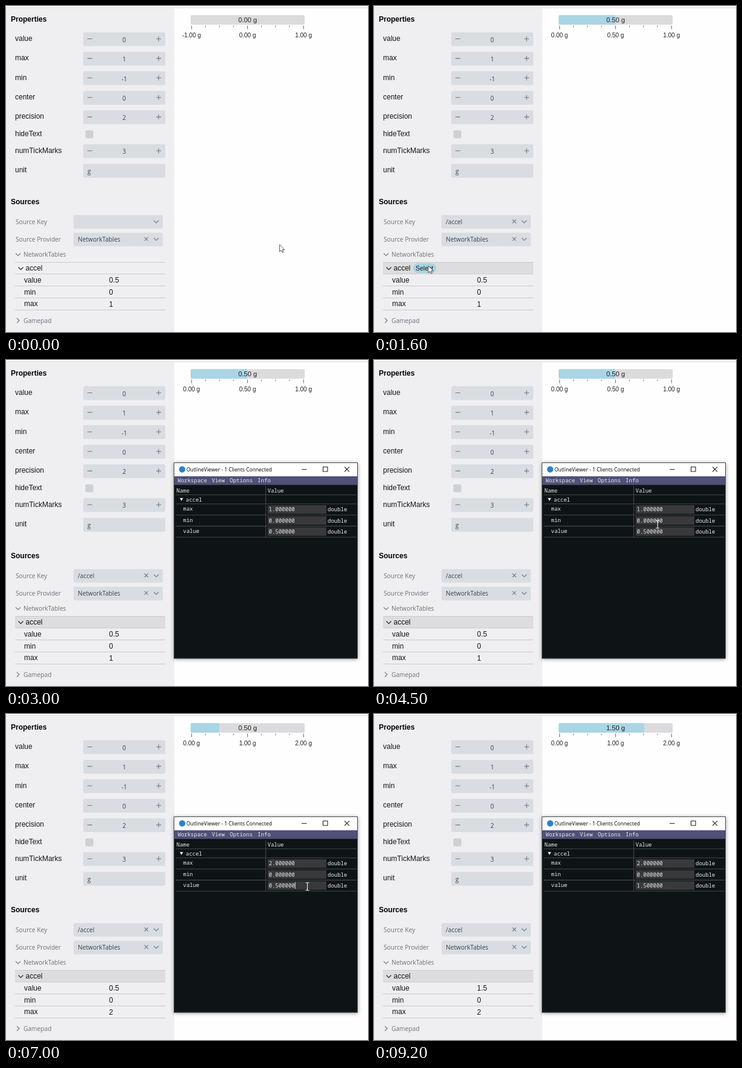
An HTML page that plays this animation: 600x541 px, repeating every 9900 ms.

```html
<!DOCTYPE html>
<html lang="en">
<head>
<meta charset="utf-8">
<title>Accelerometer properties</title>
<style>
  html, body { margin: 0; width: 100%; height: 100%; overflow: hidden; background: #fff; }
  svg { display: block; width: 600px; height: 541px; }
  text { white-space: pre; font: 12px "Liberation Sans", Arial, sans-serif; fill: #161616; }
  .head { font-weight: bold; fill: #000; }
  .ui { font: 10.2px "Open Sans", "Noto Sans", sans-serif; fill: #3b4150; }
  .dim { fill: #6d717b; }
  .mid { text-anchor: middle; }
  .tick { font-size: 10px; fill: #222; }
  .gauge { font-size: 11.2px; fill: #222; }
  .pill { font-size: 10.5px; }
  .title { font: 8.5px "Open Sans", "Noto Sans", sans-serif; fill: #000; }
  .mono { font: 9px "Noto Sans Mono", "DejaVu Sans Mono", monospace; fill: #e6e8e9; }
  .icon { fill: none; stroke: #747a84; stroke-width: 1.1; }
  .dark { stroke: #222; }
  .rule { stroke: #cac9cc; }
  .grid { stroke: #43474b; }
  .box { fill: #d9dde1; }
  .field { fill: #39393b; }
</style>
</head>
<body>
<svg id="stage" viewBox="0 0 600 541" xmlns="http://www.w3.org/2000/svg"></svg>
<script>
const LOOP = 9900, STEP = 100;
const stage = document.getElementById('stage');

const text = (x, y, s, cls = '', id = '') => `<text x="${x}" y="${y}" class="${cls}" id="${id}">${s}</text>`;
const rect = (x, y, w, h, attrs = '') => `<rect x="${x}" y="${y}" width="${w}" height="${h}" ${attrs}/>`;
const path = (d, cls = 'icon') => `<path d="${d}" class="${cls}"/>`;
const group = (id, body) => `<g id="${id}">${body}</g>`;
const box = (x, y, w, h) => rect(x, y, w, h, 'rx="2.5" class="box"');
const down = (x, y, cls) => path(`M${x - 4} ${y - 2}l4 4l4 -4`, cls);
const cross = (x, y, r, cls) => path(`M${x - r} ${y - r}l${2 * r} ${2 * r}m0 ${-2 * r}l${-2 * r} ${2 * r}`, cls);

function spinner(label, value, y) {
  return text(15, y + 2.8, label) + box(128, y - 11.5, 136, 23) +
    path(`M135 ${y - .5}h8M249 ${y - .5}h8m-4 -4v8`) + text(196, y + 4.7, value, 'ui mid');
}

function properties() {
  const rows = [['value', 0], ['max', 1], ['min', -1], ['center', 0], ['precision', 2]];
  return text(8, 26, 'Properties', 'head') +
    rows.map(([name, v], i) => spinner(name, v, 55 + i * 32.4)).join('') +
    text(15, 215.5, 'hideText') + rect(131.5, 206.3, 13.3, 13.3, 'rx="3" fill="#cdd1d5"') +
    spinner('numTickMarks', 3, 240.7) +
    text(15, 275.8, 'unit') + box(128, 262, 136, 23) + text(135, 277.5, 'g', 'ui');
}

function sources() {
  const rows = [['value', '0.5'], ['min', '0'], ['max', '1']];
  return text(8, 329.3, 'Sources', 'head') +
    text(16, 362.3, 'Source Key', 'ui dim') + box(112, 347, 148, 22.5) + down(249, 358) +
    group('key', text(119, 362.3, '/accel', 'ui') + cross(232.5, 357.5, 3)) +
    text(16, 391.3, 'Source Provider', 'ui dim') + box(112, 376.3, 148, 22.5) + down(249, 387) +
    text(119, 391.3, 'NetworkTables', 'ui') + cross(232.5, 386.7, 3) +
    down(20, 412.5) + text(29, 416.3, 'NetworkTables', 'ui dim') +
    rect(15, 426, 249, 18.5, 'fill="#dddcde" id="active"') +
    down(24.5, 435.5, 'icon dark') + text(32.5, 439.2, 'accel') +
    group('select', rect(65, 427, 38, 16, 'rx="8" fill="#a8d5e4"') + text(69, 438.8, 'Select', 'pill')) +
    path('M15 425.5h249m0 19.3h-249m0 19.7h249m0 20h-249m0 20h249', 'icon rule') +
    rows.map(([name, v], i) => text(30, 458.7 + i * 19.8, name) +
      text(170.8, 458.9 + i * 19.8, v, '', 'src-' + name)).join('') +
    path('M18 518l4 4l-4 4') + text(29, 526, 'Gamepad', 'ui dim');
}

function gauge() {
  let out = rect(306, 15.3, 189, 15.7, 'rx="2" fill="#dbdbdd"') +
    rect(306, 15.3, 0, 15.7, 'rx="2" fill="#a9d5e4" id="fill"') + text(400.5, 26.5, '', 'gauge mid', 'reading');
  for (let i = 0; i < 9; i++) {
    const major = i % 4 === 0;
    out += rect(306.9 + i * 23.2, 32.5, major ? 1.3 : 1.1, major ? 6 : 2.8, 'fill="#858585"');
    if (major) out += text(307.5 + i * 23.2, 51.5, '', 'tick mid', 'tick' + i / 4);
  }
  return out;
}

function viewer() {
  const rows = ['max', 'min', 'value'];
  const menu = { Workspace: 284.5, View: 341, Options: 371, Info: 417 };
  return rect(278.5, 170, 304.5, 325.5, 'fill="#0e1416" style="filter:drop-shadow(0 1px 3px rgba(0,0,0,.4))"') +
    rect(279, 170.5, 303.5, 22.5, 'fill="#fff"') + '<circle cx="292" cy="181.5" r="5.2" fill="#2a83c6"/>' +
    text(299, 184.8, 'OutlineViewer - 1 Clients Connected', 'title') +
    path('M490 181.5h8.5M525.5 177.5h7.5v7.5h-7.5z', 'icon dark') + cross(565, 181.3, 4, 'icon dark') +
    rect(279, 193, 303.5, 14.3, 'fill="#505177"') +
    Object.entries(menu).map(([s, x]) => text(x, 203, s, 'mono')).join('') +
    path('M281 223.8h300m0 15h-300m0 18.4h300m0 18.4h-300m0 18.4h300M430.5 209v85', 'icon grid') +
    text(282.5, 219.5, 'Name', 'mono') + text(433.5, 219.5, 'Value', 'mono') +
    '<path d="M288 229h5.6l-2.8 5z" fill="#e6e8e9"/>' + text(298, 234.5, 'accel', 'mono') +
    rows.map((name, i) => {
      const y = 241 + i * 18.3;
      return text(293.5, y + 9.2, name, 'mono') + rect(433.5, y, 97.5, 14.2, 'class="field"') +
        rect(435.5, y + 1, 44, 12, `fill="#3d6390" id="sel-${name}"`) +
        text(435.5, y + 10.3, i ? '0.000000' : '', 'mono', 'net-' + name) +
        rect(452, y + 1.5, 1, 11, `fill="#e6e8e9" id="caret-${name}"`) +
        text(533, y + 10.2, 'double', 'mono');
    }).join('') +
    rect(278.5, 170.5, 304, 324.5, 'fill="none" stroke="#45474a"');
}

stage.innerHTML =
  rect(0, 0, 600, 541, 'fill="#fefefe"') + rect(0, 2, 600, 1.6, 'fill="#e3e1e4"') +
  rect(0, 3.5, 279, 537.5, 'fill="#efeef0"') +
  properties() + sources() + gauge() + group('viewer', viewer()) +
  '<path id="arrow" d="M0 0V11.8L2.7 9.3L4.5 13.2L6.3 12.4L4.6 8.6H8.3Z" fill="#fff" stroke="#444" stroke-width=".9"/>' +
  '<path id="beam" d="M-3 -6h2.2l.8 .7l.8 -.7h2.2M0 -5.3v11.2M-3 6.5h2.2l.8 -.6l.8 .6h2.2" fill="none" stroke="#f2f2f2" stroke-width="1.1"/>';

const $ = id => document.getElementById(id);
const show = (id, on) => $(id).setAttribute('visibility', on ? 'inherit' : 'hidden');
const put = (id, s) => { if ($(id).textContent !== s) $(id).textContent = s; };
const within = (t, a, b) => t >= a && t < b;
const latest = (list, t) => list.filter(k => k[0] <= t).pop()[1];

const typed = {
  max: [[0, '1.000000'], [5600, '2'], [6000, '2.000000']],
  value: [[0, '0.500000'], [7500, '1'], [7700, '1.'], [7900, '1.5'], [8300, '1.500000']]
};

// Pointer trips: time, x, y
const trips = [
  [[0, 453.5, 396], [300, 453.5, 396], [1100, 94.5, 427], [1300, 90, 431], [1600, 90, 431], [2100, 398, 446]],
  [[3500, 423, 448], [3700, 425, 363], [3800, 425, 363], [4800, 482.5, 247.5],
   [6600, 482.5, 247.5], [7100, 501.5, 290.5], [8800, 501.5, 290.5], [9200, 494, 545]]
];

function pointer(t) {
  const trip = trips.find(k => within(t, k[0][0], k[k.length - 1][0]));
  if (!trip) return null;
  const i = trip.findIndex(k => k[0] > t);
  const [t0, x0, y0] = trip[i - 1], [t1, x1, y1] = trip[i];
  const p = (t - t0) / (t1 - t0), e = p * p * (3 - 2 * p);
  return [x0 + (x1 - x0) * e, y0 + (y1 - y0) * e];
}

function edit(name, t, click, select, type, enter) {
  const s = latest(typed[name], t);
  put('net-' + name, s);
  show('sel-' + name, within(t, select, type));
  show('caret-' + name, within(t, click, select) || within(t, type, enter));
  $('caret-' + name).setAttribute('x', 435.5 + s.length * 5.4);
}

function render(t) {
  const linked = t >= 1500;
  const value = t >= 8400 ? 1.5 : .5, max = t >= 6100 ? 2 : 1;
  const lo = linked ? 0 : -1, reading = linked ? value : 0;

  show('key', linked);
  show('active', linked);
  show('select', within(t, 1000, 1900));
  put('src-value', String(value));
  put('src-max', String(max));
  put('reading', reading.toFixed(2) + ' g');
  $('fill').setAttribute('width', linked ? 189 * value / max : 0);
  for (let i = 0; i < 3; i++) put('tick' + i, (lo + (max - lo) * i / 2).toFixed(2) + ' g');

  show('viewer', t >= 3000);
  if (t >= 3000) {
    edit('max', t, 4900, 5000, 5600, 6000);
    edit('value', t, 7000, 7100, 7500, 8300);
  } else {
    for (const n of ['max', 'value']) { show('sel-' + n, false); show('caret-' + n, false); }
  }
  show('sel-min', false);
  show('caret-min', false);

  const at = pointer(t);
  const beam = at && t > 3000 && within(at[0], 434, 531) && within(at[1], 241, 292);
  show('arrow', at && !beam);
  show('beam', beam);
  if (at) $(beam ? 'beam' : 'arrow').setAttribute('transform', `translate(${at[0]} ${at[1]})`);
}

const start = performance.now();
function tick() {
  const t = (performance.now() - start) % LOOP;
  render(Math.floor(t / STEP) * STEP);
  requestAnimationFrame(tick);
}
tick();
</script>
</body>
</html>
```
